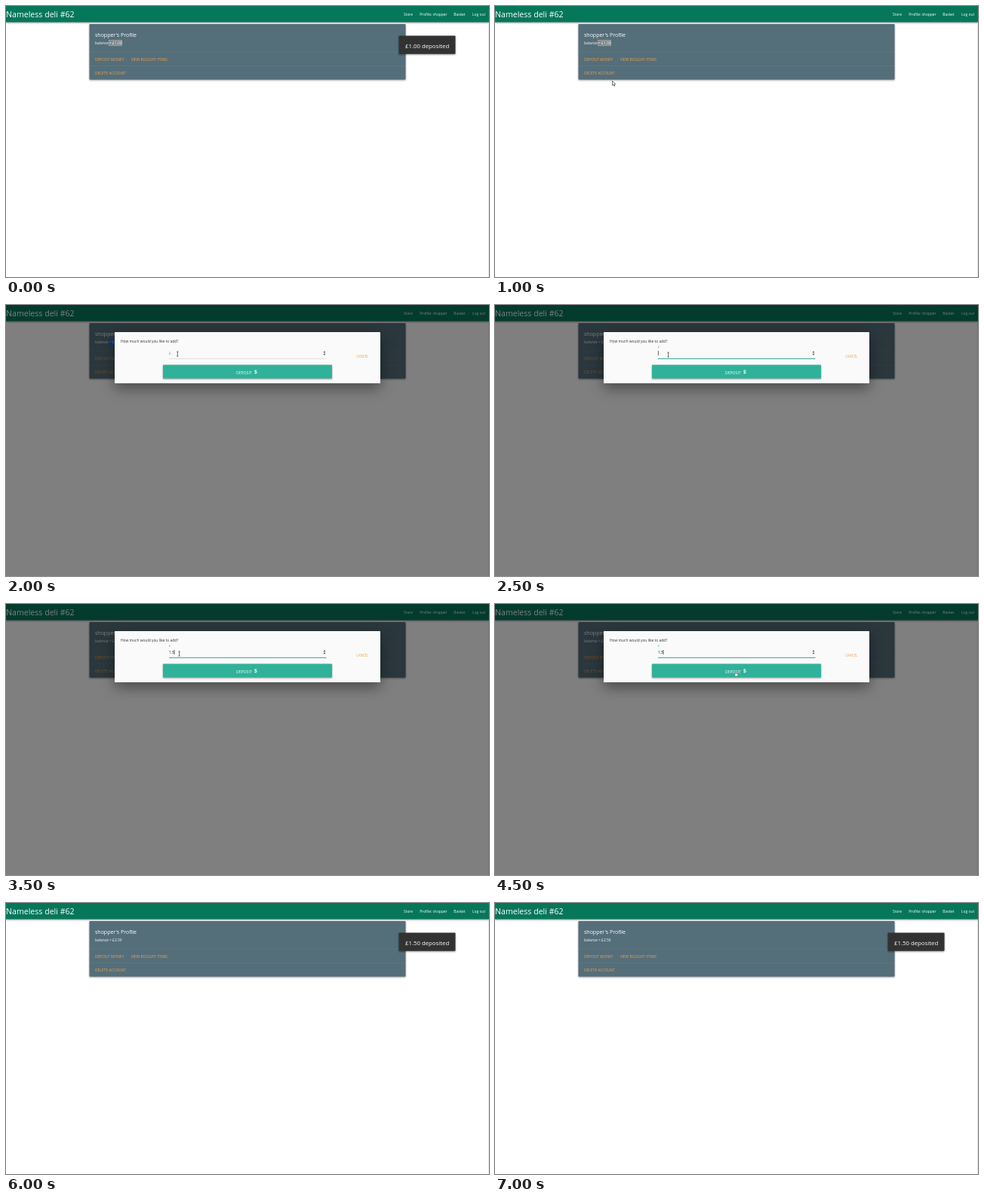
An HTML page for the animation above (7.5 s loop, 640 by 360 pixels).

```html
<!DOCTYPE html>
<html lang="en">
<head>
<meta charset="utf-8">
<title>Shop deposit</title>
<style>
  html, body { margin: 0; width: 100%; height: 100%; overflow: hidden; background: #fff; }
  svg { display: block; font: 4.9px "Open Sans", "Noto Sans", sans-serif; fill: #fff; }
  text { white-space: pre; }
  .links { fill: #f0a04b; }
  .depth { filter: drop-shadow(0 1px 1px rgba(0, 0, 0, .4)); }
  #modal.open { filter: drop-shadow(0 7px 9px rgba(0, 0, 0, .4)); }
</style>
</head>
<body>
<svg width="640" height="360" viewBox="0 0 640 360">
  <rect width="640" height="360"/>
  <rect x="639" y="22" width="1" height="338" fill="#e4e4e4"/>
  <g class="depth">
    <rect width="640" height="21.5" fill="#06775b"/>
  </g>
  <text y="14.8" font-size="10.6">Nameless deli #62</text>
  <g>
    <text x="527" y="12.8">Store</text>
    <text x="548.3" y="12.8">Profile: shopper</text>
    <text x="593.3" y="12.8">Basket</text>
    <text x="618" y="12.8">Log out</text>
  </g>

  <rect class="depth" x="110.5" y="24" width="419" height="73.7" rx=".8" fill="#546e7a"/>
  <path d="M111 61H529M111 79.5H529" stroke="#a0a0a0" stroke-opacity=".22" stroke-width=".6"/>
  <text x="118" y="40.6" font-size="7">shopper's Profile</text>
  <rect id="mark" x="136.7" y="45.5" width="17" height="7.3"/>
  <text id="balance" x="118" y="51"></text>
  <g class="links">
    <text x="118" y="72.7">DEPOSIT MONEY</text>
    <text x="165.7" y="72.7">VIEW BOUGHT ITEMS</text>
    <text x="118" y="91">DELETE ACCOUNT</text>
  </g>

  <g id="toast">
    <rect class="depth" x="520.5" y="39.5" width="75" height="24.3" rx=".8" fill="#323232"/>
    <text id="toastText" x="529" y="55.9" font-size="7.8"></text>
  </g>

  <rect id="shade" width="640" height="360" fill="#000"/>

  <g id="status">
    <path d="M0 353H147q2 0 2 2V360H0Z" fill="#929292"/>
    <text x="2" y="358.2" font-size="4" fill="#666">http://localhost:5000/profile/shopper#deposit-money-modal</text>
  </g>

  <g id="modal">
    <rect id="sheet" x="144" y="36" width="352" height="68" rx=".6" fill="#fafafa"/>
    <text x="152" y="49.6" fill="#333">How much would you like to add?</text>
    <text id="label" x="216"></text>
    <text id="amount" x="216" y="66" fill="#222"></text>
    <path id="caret" d="M223 61V67" stroke="#222" stroke-width=".7"/>
    <path id="line" d="M216 71.3H424.5"/>
    <path id="spin" d="M420.5 63.3L422 61.3L423.5 63.3ZM420.5 64.7L422 66.7L423.5 64.7Z" fill="#444"/>
    <text class="links" x="464" y="70" font-size="4.4">CANCEL</text>
    <g id="button">
      <rect class="depth" x="208" y="79.5" width="224" height="18" rx=".6" fill="#2fb299"/>
      <text x="305" y="92" font-size="5.1">DEPOSIT</text>
      <text x="328.8" y="91.4" font-size="7.6" font-weight="600">$</text>
    </g>
  </g>

  <g id="arrow"><path d="M0 0V6L1.4 4.8L2.4 7L3.3 6.6L2.3 4.5H4.2Z" stroke="#222" stroke-width=".6"/></g>
  <g id="hand"><path d="M-.7 0Q0-.8 .6 0V2.2L2.7 2.7Q3.2 3 3 4L2.4 6H-.6L-2 3.7Q-1.8 3-.7 3.7Z" stroke="#222" stroke-width=".4"/></g>
  <g id="beam"><path d="M-1.1-3H1.1M0-3V3M-1.1 3H1.1" fill="none" stroke="#333" stroke-width=".7"/></g>
</svg>
<script>
const LOOP = 7500, STEP = 500;
const $ = id => document.getElementById(id);
const set = (id, attrs) => {
  for (const key in attrs) $(id).setAttribute(key, attrs[key]);
};
const show = (id, on) => set(id, { visibility: on ? "visible" : "hidden" });

// Pointer moves: first step, shape, x, y
const moves = [
  [0], [2, "arrow", 155.5, 99.5], [3, "hand", 135, 72.5],
  [4, "beam", 227.3, 65], [5, "beam", 229.6, 66], [8, "beam", 229.6, 69.8],
  [9, "hand", 319, 90], [10, "hand", 305.5, 92.5], [12]
];

function drawPointer(step) {
  const [, shape, x, y] = moves.filter(m => m[0] <= step).pop();
  for (const id of ["arrow", "hand", "beam"]) show(id, id === shape);
  if (shape) set(shape, { transform: `translate(${x} ${y})` });
}

function drawPage(step) {
  const paid = step >= 12, selected = step === 3 || step === 4;
  $("balance").textContent = `balance = £${paid ? "2.50" : "1.00"}`;
  show("mark", step < 5);
  set("mark", selected
    ? { fill: "#2468e0", stroke: "none" }
    : { fill: "#7d878b", stroke: "#d0bfb5", "stroke-width": .5 });

  const leaving = step === 1;
  show("toast", step < 2 || paid);
  set("toast", { opacity: leaving ? .35 : 1, transform: `translate(0 ${leaving ? -26 : 0})` });
  $("toastText").textContent = `£${paid ? "1.50" : "1.00"} deposited`;
}

function drawModal(step) {
  const open = step >= 3 && step < 12, opening = step === 3;
  const focused = step >= 5 && step < 11;
  show("shade", open);
  set("shade", { opacity: opening ? .125 : .5 });
  show("status", opening);

  set("modal", {
    display: open ? "inline" : "none",
    class: opening ? "" : "open",
    transform: opening ? "translate(320 56) scale(.871) translate(-320 -70)" : "",
  });
  set("sheet", { "fill-opacity": opening ? .2 : 1 });
  set("button", { opacity: opening ? .6 : 1 });
  for (const el of $("modal").querySelectorAll(":scope > text"))
    el.setAttribute("opacity", opening ? .4 : 1);

  const raised = step >= 5;
  $("label").textContent = "£";
  set("label", {
    y: raised ? 57 : 66, "font-size": raised ? 3.8 : 4.9,
    fill: focused ? "#26a69a" : "#999",
  });
  const typed = step < 6 ? "" : step < 7 ? "1" : "1.5";
  $("amount").textContent = typed;
  set("caret", {
    display: focused && step !== 8 && step !== 10 ? "inline" : "none",
    transform: `translate(${typed.length === 3 ? 0 : typed ? -3.8 : -6.6} 0)`,
  });
  set("line", {
    stroke: focused ? "#26a69a" : raised ? "#8fb5b0" : "#ccc",
    "stroke-width": focused ? 1 : .6, opacity: opening ? .2 : 1,
  });
  set("spin", { display: step < 11 ? "inline" : "none", opacity: opening ? .2 : 1 });
}

let last = -1;
function frame(now) {
  const step = Math.floor(now % LOOP / STEP);
  if (step !== last) {
    drawPage(step);
    drawModal(step);
    drawPointer(step);
    last = step;
  }
  requestAnimationFrame(() => frame(performance.now()));
}
frame(performance.now());
</script>
</body>
</html>
```
